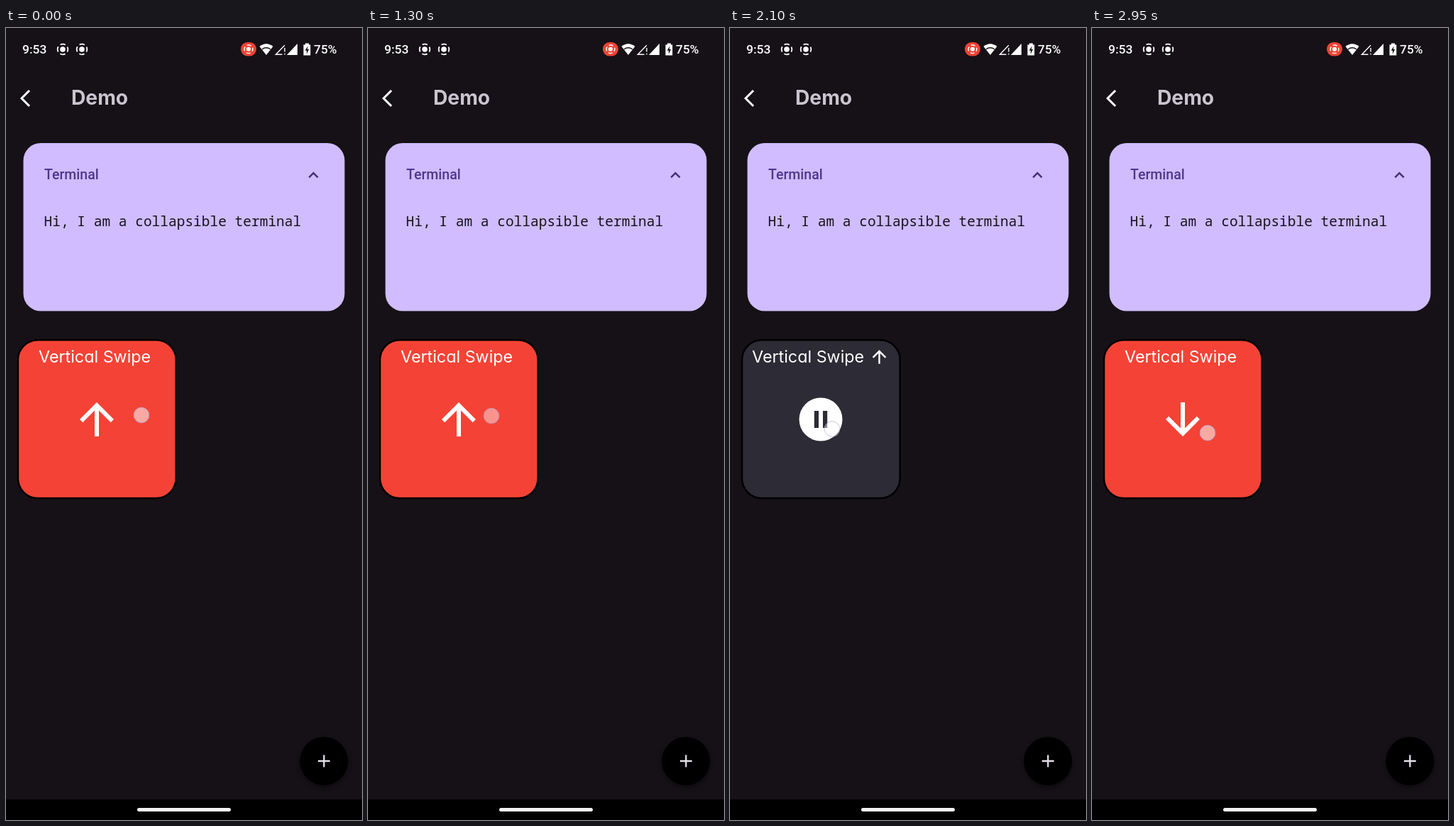
These frames come from a looping animation (502 px wide and 1115 px high, 3000 ms). An HTML page:

```html
<!DOCTYPE html>
<html lang="en">
<head>
<meta charset="utf-8">
<title>Vertical swipe demo</title>
<style>
  html, body { margin: 0; width: 100%; height: 100%; overflow: hidden; background: #151116; }
  svg { display: block; width: 100%; height: 100%; }
  .status { font: 500 17.4px Roboto, sans-serif; fill: #fff; }
  .heading { font: 700 28.2px Inter, sans-serif; fill: #cac4cf; }
  .label { font: 500 19.5px Roboto, sans-serif; fill: #4f378b; }
  .mono { font: 400 19.5px "Noto Sans Mono", monospace; fill: #17121c; }
  .title { font: 400 23.3px Inter, sans-serif; fill: #fff; }
  .heading, .title { font-feature-settings: "cv11"; }
  .line { fill: none; stroke: #fff; }
  #fab { filter: drop-shadow(0 3px 3px #0006); }
</style>
</head>
<body>
<svg viewBox="0 0 502 1115">
  <defs>
    <path id="arrow" fill="#fff" d="M-8 0l1.41 1.41L-1 -4.17V8h2V-4.17l5.58 5.59L8 0 0-8z"/>
    <g id="record">
      <circle r="3.8" fill="#fff"/>
      <circle r="7.3" class="line" stroke-width="1.8" stroke-dasharray="7.6 3.867" stroke-dashoffset="3.8"/>
    </g>
  </defs>
  <rect width="502" height="1115" fill="#151116"/>

  <!-- Status bar -->
  <text class="status" x="23" y="36">9:53</text>
  <use href="#record" x="80" y="30"/>
  <use href="#record" x="107" y="30"/>
  <rect x="331" y="20" width="22" height="19.5" rx="9.7" fill="#ee4336"/>
  <use href="#record" transform="translate(342 29.8) scale(.8)"/>
  <path d="M357.5 26Q367 18.5 376.5 26L367 38z" fill="#fff"/>
  <path d="M361 30Q367 25.5 373 30" class="line" style="stroke:#151116" stroke-width="1.4"/>
  <path d="M389.5 37.3H380.5L393 24.3M393 28V33.5M393 35.8V37.6" class="line" stroke-width="1.4"/>
  <path d="M396 38L411 22V38z" fill="#fff"/>
  <path d="M422 21.5h5v2h2.3v15h-9.8v-15h2.5z" fill="#fff"/>
  <path d="M425.6 25.5L421.8 31.8H424V36.5L427.2 30H425z" fill="#151116"/>
  <text class="status" x="434" y="36">75%</text>

  <!-- App bar -->
  <path d="M33 88L22 99L33 110" class="line" stroke-width="3"/>
  <text class="heading" x="92" y="108">Demo</text>

  <!-- Terminal panel -->
  <rect x="24.5" y="162" width="453" height="236.5" rx="24.4" fill="#d0bcff"/>
  <text class="label" x="54" y="213">Terminal</text>
  <path d="M427.3 210.3L433.5 204.1L439.7 210.3" class="line" style="stroke:#432e77" stroke-width="2.4"/>
  <text class="mono" x="53.5" y="279">Hi, I am a collapsible terminal</text>

  <!-- Swipe card -->
  <rect id="card" x="16.9" y="439.2" width="222.8" height="222.8" rx="28" stroke="#000" stroke-width="2.5"/>
  <text id="title" class="title" y="471">Vertical Swipe</text>
  <use id="direction" href="#arrow"/>
  <g id="idle">
    <use href="#arrow" transform="translate(210.5 463) scale(1.22)"/>
    <circle cx="128" cy="551" r="30.5" fill="#fff"/>
    <path d="M118.8 539h6.2v24h-6.2zM131 539h6.2v24h-6.2z" fill="#2d2b35"/>
  </g>
  <circle id="touch" r="10.8" fill="#fff" fill-opacity=".54" stroke="#a9a6dc" stroke-opacity=".8"/>

  <!-- Floating button and navigation bar -->
  <circle id="fab" cx="448.3" cy="1032" r="34"/>
  <path d="M440 1032H456.8M448.4 1023.6V1040.4" class="line" style="stroke:#e8e0ec" stroke-width="2.3"/>
  <rect y="1086" width="502" height="29"/>
  <rect x="185" y="1098" width="132" height="5" rx="2.5" fill="#f4f4f4"/>
</svg>
<script>
const LOOP = 3000, STEP = 50, FADE = 250;
const IDLE_FROM = 2100, IDLE_TO = 2600;
const FLIP_Y = 558;   // below this height the arrow points down

// Each gesture drifts from one point to another, then fades after release.
const gestures = [
  { press: 0,    release: 50,   from: [191, 545], to: [191, 545] },
  { press: 850,  release: 1300, from: [155, 542], to: [174, 546] },
  { press: 1650, release: 2100, from: [152, 542], to: [144, 564.5] },
  { press: 2550, release: 2950, from: [176, 549], to: [163, 570], held: true },
];

const byId = id => document.getElementById(id);
const [card, title, direction, idle, touch] =
  ["card", "title", "direction", "idle", "touch"].map(byId);
const clamp = v => Math.min(1, Math.max(0, v));
const smooth = v => v * v * (3 - 2 * v);

function draw(t) {
  const g = gestures.findLast(g => t >= g.press);
  const k = smooth(clamp((t - g.press) / (g.release - g.press)));
  const [x, y] = g.from.map((v, i) => v + (g.to[i] - v) * k);
  const isIdle = t >= IDLE_FROM && t < IDLE_TO;

  touch.setAttribute("cx", x);
  touch.setAttribute("cy", y);
  touch.setAttribute("opacity",
    g.held || t < g.release ? 1 : clamp(1 - (t - g.release + STEP) / FADE));

  card.setAttribute("fill", isIdle ? "#2d2b35" : "#f44336");
  title.setAttribute("x", isIdle ? 31 : 46);
  idle.setAttribute("visibility", isIdle ? "visible" : "hidden");
  direction.setAttribute("visibility", isIdle ? "hidden" : "visible");
  direction.setAttribute("transform", `translate(128 551) scale(3 ${y > FLIP_Y ? -3 : 3})`);
}

function tick(now) {
  draw(Math.floor(now % LOOP / STEP) * STEP);
  requestAnimationFrame(tick);
}
draw(0);
requestAnimationFrame(tick);
</script>
</body>
</html>
```
